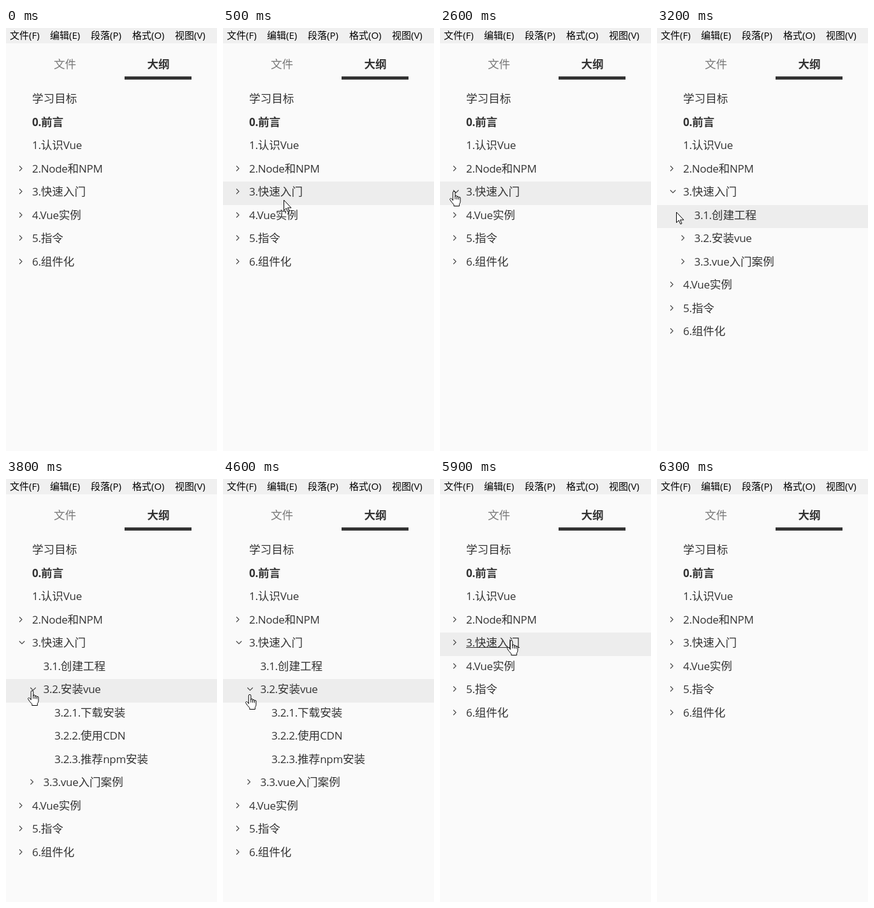
Recreate the animation shown at these times as an HTML page. Size 331 by 664 pixels, loop 7.4 s.

```html
<!DOCTYPE html>
<html lang="zh-CN">
<head>
<meta charset="utf-8">
<title>大纲</title>
<style>
html, body { margin: 0; width: 100%; height: 100%; overflow: hidden; background: #fafafa; }
svg { display: block; }
text { font-family: "Open Sans", "Noto Sans CJK SC", "Noto Sans CJK", sans-serif; fill: #333; white-space: pre; }
.menu text { font-size: 15px; fill: #000; }
.tab, .row text { font-size: 17.6px; font-weight: 300; }
.row .latin { font-size: 17px; font-weight: 400; letter-spacing: -.3px; }
.tab { fill: #777; }
.tab.on, .row.on text, .row.on .latin { font-weight: 700; fill: #333; }
.fold { fill: none; stroke: #444; stroke-width: 1.1; }
.cursor { fill: #fff; stroke: #000; stroke-width: 1; stroke-linejoin: round; stroke-linecap: round; }
</style>
</head>
<body>
<svg id="stage" width="331" height="664" viewBox="0 0 331 664"></svg>
<script>
const LOOP = 7400, STEP = 100;
const TOP = 95.4, PITCH = 36.5, INDENT = 17.5, LEFT = 41;
const stage = document.getElementById('stage');

function add(parent, tag, attrs, content) {
  const el = document.createElementNS('http://www.w3.org/2000/svg', tag);
  for (const k in attrs) el.setAttribute(k, attrs[k]);
  if (content) el.textContent = content;
  return parent.appendChild(el);
}
const show = (el, on) => el.setAttribute('display', on ? 'inline' : 'none');

// Menu bar and tabs
const menu = add(stage, 'g', { class: 'menu' });
add(menu, 'rect', { width: 331, height: 24, fill: '#f0f0f0' });
[['文件(F)', 6], ['编辑(E)', 69], ['段落(P)', 133], ['格式(O)', 198], ['视图(V)', 265]]
  .forEach(([label, x]) => add(menu, 'text', { x, y: 17 }, label));
add(stage, 'text', { class: 'tab', x: 75, y: 63 }, '文件');
add(stage, 'text', { class: 'tab on', x: 221.5, y: 63 }, '大纲');
add(stage, 'rect', { x: 186, y: 76, width: 105, height: 5, fill: '#333' });

const hover = add(stage, 'rect', { width: 331, fill: '#ededed' });

// Outline: the chevron turns first, the children follow
const folds = {
  '2': { turn: [800, 2000], open: [1200, 2200] },
  '3': { turn: [2600, 5500], open: [2800, 5700] },
  '3.2': { turn: [3600, 4700], open: [3800, 4900] },
  '3.3': {}, '4': {}, '5': {}, '6': {}
};
const within = (t, span) => !!span && t >= span[0] && t < span[1];

const rows = [
  '学习目标', '0.前言', '1.认识Vue',
  '2.Node和NPM', '2.1.下载Node.js', '2.2.NPM',
  '3.快速入门', '3.1.创建工程',
  '3.2.安装vue', '3.2.1.下载安装', '3.2.2.使用CDN', '3.2.3.推荐npm安装',
  '3.3.vue入门案例', '4.Vue实例', '5.指令', '6.组件化'
].map(makeRow);

function makeRow(label) {
  const parts = label.match(/^[\d.]*/)[0].split('.').filter(Boolean);
  const key = parts.join('.');
  const x = LEFT + INDENT * Math.max(0, parts.length - 1);
  const g = add(stage, 'g', { class: key === '0' ? 'row on' : 'row' });
  const text = add(g, 'text', { x, y: 0 });
  for (const run of label.match(/[\x20-\x7e]+|[^\x20-\x7e]+/g))
    add(text, 'tspan', { class: run.charCodeAt(0) < 128 ? 'latin' : 'han' }, run);
  const line = add(g, 'rect', { x, y: 1, height: 1, fill: '#333' });
  const fold = folds[key];
  const chevron = fold && add(g, 'path', { class: 'fold' });
  const parents = parts.slice(1).map((_, i) => parts.slice(0, i + 1).join('.'));
  return { x, g, text, line, fold, chevron, parents };
}

// Pointer, drawn with its tip at the origin
const hand = add(stage, 'path', { class: 'cursor', d:
  'M-1.8 13V2.2A1.8 1.8 0 0 1 1.8 2.2V9V8.3A1.4 1.4 0 0 1 4.6 8.6V10V9.2A1.4 1.4 0 0 1 7.3 9.6V11' +
  'V10.5A1.3 1.3 0 0 1 9.9 11V16.5Q9.9 18.5 8.3 20.5V23.5H-.2V21.3Q-4 17.5-6.2 13.7' +
  'C-7.2 11.8-5 10.6-3.7 12.2L-1.8 14.6V13M1.8 9V12.5M4.6 10V12.8M7.3 11V13' });
const arrow = add(stage, 'path', { class: 'cursor', d: 'M.5.5V16.5L4.2 13 6.8 18.8 9 17.9 6.4 12.2H11.5Z' });

const path = [
  [100, 257, 160], [300, 190, 215], [500, 95, 270], [600, 60, 290], [700, 36, 255], [800, 26, 224],
  [1900, 26, 224], [2100, 26, 227], [2500, 23, 252], [2600, 22, 256],
  [2900, 22, 256], [3300, 33, 300], [3500, 42, 338], [3600, 41, 332],
  [4000, 41, 332], [4300, 45, 350], [4700, 41, 334],
  [4800, 41, 334], [5100, 30, 287], [5500, 23, 256],
  [5600, 23, 256], [5900, 112, 253], [6300, 325, 172]
];

function pointer(t) {
  const i = path.findIndex(p => p[0] > t);
  if (i < 1) return null;
  const [t0, x0, y0] = path[i - 1], [t1, x1, y1] = path[i];
  const k = (t - t0) / (t1 - t0);
  return { x: x0 + (x1 - x0) * k, y: y0 + (y1 - y0) * k };
}

function render(time) {
  const t = Math.floor(time / STEP) * STEP;
  const p = pointer(t);
  const target = p ? Math.floor((p.y - TOP) / PITCH) : -1;
  let index = 0, link = false;

  for (const r of rows) {
    const visible = r.parents.every(k => within(t, folds[k].open));
    show(r.g, visible);
    if (!visible) continue;
    const base = Math.round(TOP + 21.7 + PITCH * index);
    r.g.setAttribute('transform', `translate(0 ${base})`);
    if (r.chevron) {
      const x = r.x - 20;
      r.chevron.setAttribute('d', within(t, r.fold.turn)
        ? `M${x - .2} -8.5l4.2 4.2 4.2-4.2` : `M${x} -10.5l4 4-4 4`);
    }
    let under = false;
    if (index === target) {
      const width = r.text.getComputedTextLength();
      under = p.x >= r.x && p.x <= r.x + width && Math.abs(p.y - base + 6) < 12;
      link = under || (!!r.chevron && Math.abs(p.x - r.x + 16) < 12);
      r.line.setAttribute('width', width);
    }
    show(r.line, under);
    index++;
  }

  show(hover, target >= 0);
  if (target >= 0) {
    const y = Math.round(TOP + PITCH * target);
    hover.setAttribute('y', y);
    hover.setAttribute('height', Math.round(TOP + PITCH * (target + 1)) - y);
  }
  show(hand, !!p && link);
  show(arrow, !!p && !link);
  if (p) {
    const at = `translate(${Math.round(p.x)} ${Math.round(p.y)})`;
    hand.setAttribute('transform', at);
    arrow.setAttribute('transform', at);
  }
}

const start = performance.now();
function tick() {
  render((performance.now() - start) % LOOP);
  requestAnimationFrame(tick);
}
tick();
</script>
</body>
</html>
```
